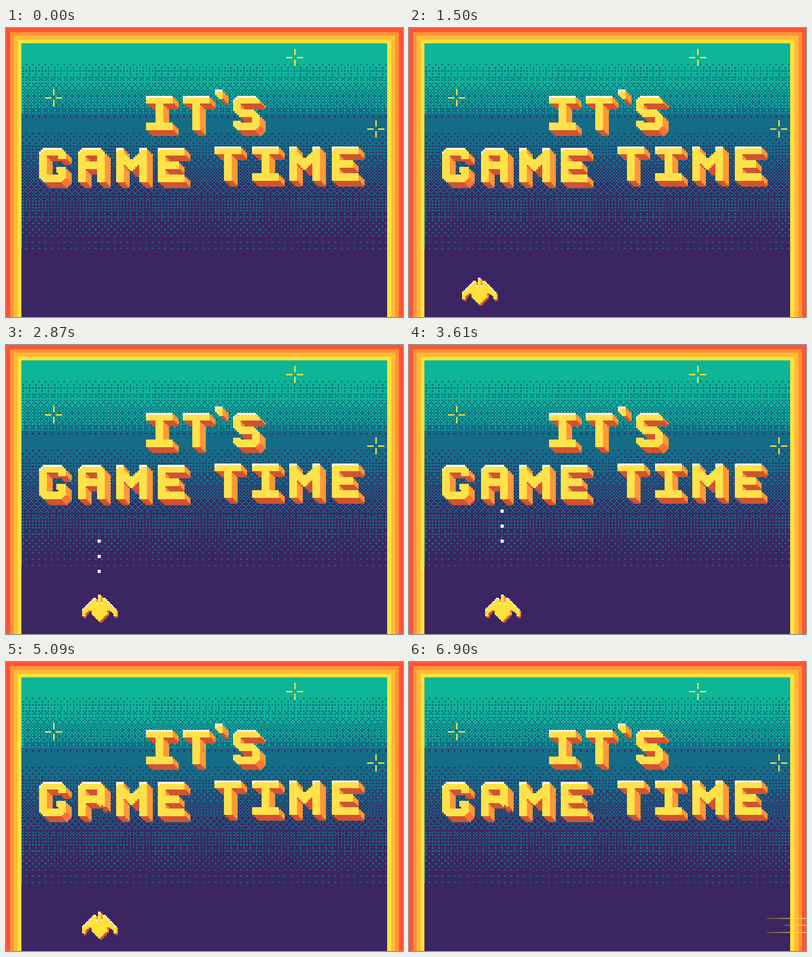
Write an HTML page with a canvas that moves like this. It is 876x639 px and loops after 7170 ms.

```html
<!DOCTYPE html>
<html lang="en">
<head>
<meta charset="utf-8">
<title>It's game time</title>
<style>
html, body { margin: 0; width: 100%; height: 100%; overflow: hidden; }
canvas { display: block; }
</style>
</head>
<body>
<canvas id="stage" width="876" height="639"></canvas>
<script>
const W = 876, H = 639, LOOP = 7170;
const TEAL = '#0cb697', BLUE = '#146c87', PURPLE = '#3b2663';
const YELLOW = '#ffe13a', FACE = '#ffe24a', ORANGE = '#ff9838', RED = '#d2532f', WHITE = '#fff';
const stage = document.getElementById('stage').getContext('2d');
const backdrop = document.createElement('canvas');
backdrop.width = W;
backdrop.height = H;

// Rectangle with edges snapped to whole pixels, so neighbours never leave a seam.
function box(ctx, color, x, y, w, h) {
  const l = Math.round(x), t = Math.round(y);
  ctx.fillStyle = color;
  ctx.fillRect(l, t, Math.round(x + w) - l, Math.round(y + h) - t);
}

// ---- background ----
const BAYER = [[0, 8, 2, 10], [12, 4, 14, 6], [3, 11, 1, 9], [15, 7, 13, 5]];
const DOT = 3.478, DOT_X = 43.3;

// Ordered dither; `filled` gets the cell threshold and the distance from row 0.
function dither(ctx, color, top, from, to, filled) {
  for (let r = from; r <= to; r++) {
    for (let c = -2; c < 230; c++) {
      if (filled(BAYER[r & 3][c & 3] + .5, Math.abs(r) * DOT)) {
        box(ctx, color, DOT_X + c * DOT, top + r * DOT, DOT, DOT);
      }
    }
  }
}

function sparkle(ctx, x, y) {
  for (const s of [-12, 12]) {
    box(ctx, YELLOW, x + s - 7, y - 1.5, 14, 3);
    box(ctx, YELLOW, x - 1.5, y + s - 7, 3, 14);
  }
}

function paintBackdrop(ctx) {
  ['#ff5338', '#ff9238', '#ffbb36', '#ffe23a'].forEach((color, i) => {
    const inset = i * 8.7;
    box(ctx, color, inset, inset, W - 2 * inset, H);
  });

  ctx.beginPath();
  ctx.rect(34, 34, 807, H);
  ctx.clip();
  box(ctx, TEAL, 0, 0, W, 189);
  box(ctx, BLUE, 0, 189, W, 302);
  box(ctx, PURPLE, 0, 489.3, W, 150);
  dither(ctx, BLUE, 65.3, 0, 35, (v, d) => .5 + .078 * d + .000235 * d * d > v);
  dither(ctx, PURPLE, 485.8, -76, 0, (v, d) => .51 + .0257 * d + .000124 * d * d <= v);
  for (let c = 0; c < 230; c += 4) box(ctx, PURPLE, DOT_X + c * DOT, 194.3, DOT, DOT);

  sparkle(ctx, 637, 65);
  sparkle(ctx, 105, 154);
  sparkle(ctx, 816, 223);
}

// ---- extruded pixel art ----
function extrude(art, x0, y0, unit, depth) {
  const { w, h, face, solid, shine, soft } = art;
  for (let y = 0; y < h + depth; y++) {
    for (let x = 0; x < w + depth; x++) {
      let color = solid(x, y) && (shine(x, y) ? WHITE : face);
      for (let k = 1; k <= depth && !color; k++) {
        if (!solid(x - k, y - k)) continue;
        const right = solid(x - k + 1, y - k), below = solid(x - k, y - k + 1);
        color = right && !below ? RED : below && !right ? ORANGE
          : soft && x > 10 && y > 14 ? '#f9743a' : RED;
      }
      if (color) box(stage, color, x0 + x * unit, y0 + y * unit, unit, unit);
    }
  }
}

// A letter is a union of [x, y, w, h] bars; corners named in `cut` are stepped off.
function glyph(w, h, bars, cut = '') {
  const solid = (x, y) => {
    const r = w - 1 - x, b = h - 1 - y;
    if (cut.includes('a') && x + y < 2 || cut.includes('b') && r + y < 2 ||
        cut.includes('c') && r + b < 2 || cut.includes('d') && x + b < 2) return false;
    return bars.some(([bx, by, bw, bh]) => x >= bx && x < bx + bw && y >= by && y < by + bh);
  };
  const shine = (x, y) => y === 0 || y <= (cut ? 2 : 1) && !solid(x - 1, y);
  return { w, h, face: FACE, solid, shine, soft: cut.includes('c') };
}

const TOP = [0, 0, 14, 4], BASE = [0, 14, 14, 4], LEFT = [0, 0, 4, 18], MIDDLE = [5, 0, 4, 18];
const valley = [0, 1, 2, 3, 3, 2, 1, 0].map((d, i) => [4 + i, 3 + d, 1, 6]);
const FONT = {
  I: glyph(14, 18, [TOP, MIDDLE, BASE]),
  T: glyph(14, 18, [TOP, MIDDLE]),
  E: glyph(14, 18, [LEFT, TOP, [0, 7, 11, 4], BASE]),
  M: glyph(16, 18, [LEFT, [12, 0, 4, 18], ...valley]),
  A: glyph(14, 18, [LEFT, TOP, [10, 0, 4, 18], [0, 7, 14, 4]], 'ab'),
  G: glyph(14, 18, [LEFT, TOP, [10, 0, 4, 6], BASE, [10, 10, 4, 8], [9, 10, 5, 3]], 'abcd'),
  S: glyph(14, 18, [TOP, [0, 0, 4, 8], [1, 7, 10, 1], [1, 8, 11, 1], [2, 9, 11, 1],
    [3, 10, 11, 1], [10, 10, 4, 8], BASE, [0, 13, 4, 5]], 'abcd'),
  '`': glyph(4, 5, [[0, 0, 4, 3], [1, 3, 3, 1], [2, 4, 2, 1]])
};
const TITLE = [
  ['I', 309, 150], ['T', 390, 150], ['`', 461, 136], ['S', 501, 150],
  ['G', 73, 265], ['A', 159, 265], ['M', 243, 265], ['E', 335, 265],
  ['T', 460, 262], ['I', 543, 262], ['M', 625, 262], ['E', 719, 262]
];

// Right leg of the A, shortened with a ragged edge after each hit.
function damaged(art, hits) {
  const end = [18, 16, 14, 12][hits];
  const solid = (x, y) => art.solid(x, y) &&
    (!hits || x < 10 || y < end || y === end && (x === 11 || x === 13));
  return { ...art, solid };
}

// Top and bottom of each ship column, from the centre outwards.
const HULL_TOP = [0, 5, 2, 2, 3, 4, 5, 6, 7, 8, 9];
const HULL_END = [17, 16, 15, 14, 13, 10, 10, 11, 12, 14, 14];
const inHull = (x, y) => {
  const c = Math.abs(x - 10.5) - .5;
  return c <= 10 && y >= HULL_TOP[c] && y < HULL_END[c];
};
const SHIP = { w: 22, h: 17, face: YELLOW, solid: inHull, shine: (x, y) => !inHull(x, y - 1) };

function speedLine(x, end, y) {
  stage.fillStyle = YELLOW;
  stage.beginPath();
  stage.moveTo(x, y - .3);
  stage.lineTo(end, y - 1.4);
  stage.lineTo(end, y + 1.4);
  stage.lineTo(x, y + .3);
  stage.fill();
}

// ---- timeline ----
function draw(t) {
  stage.drawImage(backdrop, 0, 0);
  const shot = Math.floor((t - 2500) / 370);
  const hits = Math.max(0, Math.min(3, shot - 4));
  for (const [ch, x, y] of TITLE) {
    extrude(ch === 'A' ? damaged(FONT.A, hits) : FONT[ch], x, y, 4.24, 3);
  }

  if (shot >= 0 && shot < 7) {
    for (let i = hits; i < 3; i++) box(stage, WHITE, 202, 463.6 + (i - shot) * 33.3, 7, 7);
  }

  let x = t < 2000 ? 117 : 168;
  const y = 552 + (t < 1000 ? 44 : t < 1500 ? 22 : 0);
  if (t >= 6090) {
    x = 330 + Math.floor((t - 6090) / 270) * 196.67;
    speedLine(x - 130, x - 1, 567);
    speedLine(x - 93, x - 13, 582);
    speedLine(x - 130, x - 13, 598);
  }
  if (t >= 500) extrude(SHIP, x, y, 3.45, 1);
}

function tick() {
  draw(performance.now() % LOOP);
  requestAnimationFrame(tick);
}

paintBackdrop(backdrop.getContext('2d'));
tick();
</script>
</body>
</html>
```
